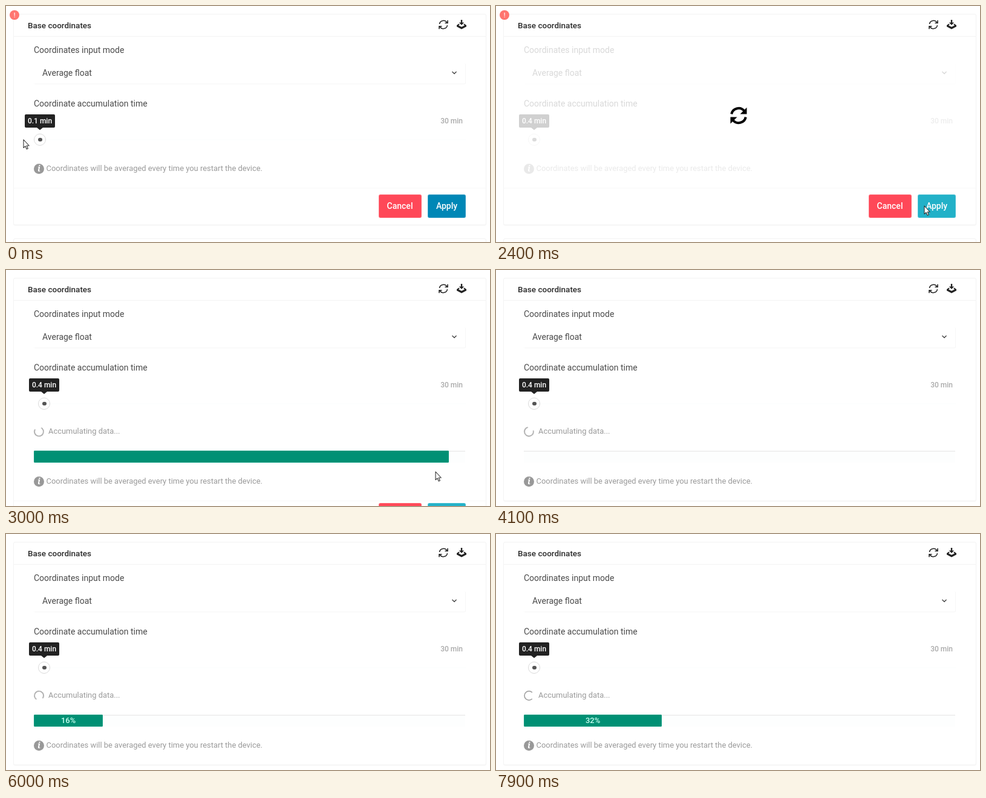
These frames come from a looping animation (800 px wide and 392 px high, 8 s). An HTML page:

```html
<!DOCTYPE html>
<html lang="en">
<head>
<meta charset="utf-8">
<title>Base coordinates</title>
<style>
* { box-sizing: border-box; }
html, body { margin: 0; width: 100%; height: 100%; overflow: hidden; background: #fff; }
.stage {
  position: relative; width: 800px; height: 392px; overflow: hidden;
  font: 14px/20px Roboto, sans-serif; color: #4a4a4a; background: #fff;
}
.stage > * { position: absolute; white-space: nowrap; }
.stage *, .stage *::after { animation: 8s linear infinite; }
svg { display: block; overflow: visible; }

/* Panel frame */
.column { left: 12px; top: 13px; width: 782px; }
.card { border: 1px solid #f3f3f3; border-radius: 3px; background: #fff; box-shadow: 0 1px 1px #f8f8f8; }
.head { height: 37px; border-bottom: 1px solid #f4f4f4; }
.body { height: 251px; animation-name: grow; }
.foot {
  position: relative; height: 61px; overflow: hidden; border-top: 1px solid #f8f8f8;
  animation-name: collapse;
}
.next { height: 60px; margin-top: 22px; }
.btn {
  position: absolute; top: 10px; height: 39px; border: 1px solid #fff3; border-radius: 3px; color: #fff;
  font-weight: 500; line-height: 37px; text-align: center;
}
.cancel { left: 602.5px; width: 71px; background: #ff4858; animation-name: lift; }
.apply { left: 684px; width: 63px; background: #0087b6; animation-name: lift, hover; }

/* Form */
.title { left: 36px; top: 22px; font-size: 13.5px; font-weight: 500; color: #2b2b2b; }
.select { left: 46px; top: 95px; width: 714px; height: 35px; border: solid #f6f6f6; border-width: 0 1px 1px 0; border-radius: 3px; }
.track { left: 66px; top: 221px; width: 694px; height: 2px; background: #fdfefe; }
.max { right: 45px; top: 181px; font-size: 12px; font-weight: 500; color: #aaa; }
.slider { left: 56px; top: 180px; animation-name: slide; }
.tip {
  position: absolute; left: -25px; width: 50px; height: 22px; border-radius: 2px;
  background: #222; color: #fff; font-size: 12px; font-weight: 500; line-height: 22px; text-align: center;
}
.tip::before { content: ""; position: absolute; left: 20px; top: 22px; border: 5px solid transparent; border-top: 4px solid #222; border-bottom: 0; }
.tip::after { content: "0.1 min"; animation-name: minutes; }
.knob { position: absolute; left: -10px; top: 32px; width: 20px; height: 20px; border: 1px solid #d9d9d9; border-radius: 50%; background: #fff; }
.knob::before { content: ""; position: absolute; left: 5.5px; top: 6px; width: 7px; height: 6px; border-radius: 3px; background: #555; }
.note { left: 46px; top: 260px; font-size: 12.93px; color: #9a9a9a; animation-name: push; }
.note span { position: absolute; left: 20.5px; top: 0; }
.note b {
  position: absolute; left: 0; top: 1.5px; width: 17px; height: 17px; border-radius: 50%; background: #999;
  color: #fff; font: italic bold 14px/16px "Noto Serif", serif; text-align: center;
}

/* Accumulation */
.acc { left: 46px; top: 258px; width: 714px; height: 64px; font-size: 12.93px; color: #9a9a9a; visibility: hidden; }
.stage > .acc { animation-name: reveal; }
.acc > span { position: absolute; left: 24px; top: 0; }
.ring { position: absolute; left: 0; top: 2px; animation-name: ring; }
.bar { position: absolute; top: 42px; width: 713px; height: 20px; border-top: 2px solid #f0f0f0; background: #fdfefe; }
.fill {
  position: absolute; top: -2px; height: 20px; width: 100%; overflow: hidden; border-radius: 2px;
  background: #009074; box-shadow: inset 0 0 0 1px #0a9c81;
  color: #c9fff1; font-weight: 500; line-height: 20px; text-align: center;
  animation-name: fill;
}
.fill::after { content: ""; animation-name: percent; }

/* Loading and pointer */
.veil { left: 13px; top: 51px; width: 780px; height: 251px; background: #fff; opacity: 0; animation-name: veil; }
.sync { left: 386px; top: 167px; opacity: 0; animation-name: sync, show; }
.badge {
  left: 6px; top: 6.5px; width: 16px; height: 16px; border-radius: 50%; background: #ff6f69; color: #fff;
  font-size: 10px; font-weight: 500; line-height: 17px; text-align: center; animation-name: badge;
}
.cursor { left: 0; top: 0; animation-name: cursor; }

@keyframes grow { 0% { height: 251px; animation-timing-function: step-end } 33.75%, 100% { height: 332px } }
@keyframes collapse {
  0%, 34.25% { height: 61px; border-top-width: 1px; animation-timing-function: ease-in-out }
  39.25%, 100% { height: 0; border-top-width: 0 }
}
@keyframes lift { 0%, 34.25% { top: 10px; animation-timing-function: ease-in-out } 39.25%, 100% { top: 0 } }
@keyframes hover { 0%, 8.7% { background-color: #0087b6 } 11%, 100% { background-color: #22b1c8 } }
@keyframes slide { 0% { transform: none; animation-timing-function: step-end } 3.75%, 100% { transform: translateX(7px) } }
@keyframes minutes { 0% { content: "0.1 min"; animation-timing-function: step-end } 3.75%, 100% { content: "0.4 min" } }
@keyframes push { 0% { transform: none; animation-timing-function: step-end } 33.75%, 100% { transform: translateY(81px) } }
@keyframes reveal { 0% { visibility: hidden; animation-timing-function: step-end } 33.75%, 100% { visibility: visible } }
@keyframes veil { 0%, 8.5% { opacity: 0 } 11%, 31.25% { opacity: .79 } 33.7%, 100% { opacity: 0 } }
@keyframes show { 0%, 8.5% { opacity: 0 } 11%, 31.25% { opacity: 1 } 33.7%, 100% { opacity: 0 } }
@keyframes sync { 0% { transform: rotate(-432deg) } 100% { transform: rotate(1008deg) } }
@keyframes badge {
  0%, 8.75%, 18.75%, 28.75% { opacity: .95 }
  13.75%, 23.75% { opacity: .85 }
  33.7% { opacity: 1 }
  33.75%, 100% { opacity: 0 }
}
@keyframes ring {
  0%, 33.75% { transform: rotate(-230deg) }
  37.5% { transform: rotate(-105deg) }
  51.25% { transform: rotate(300deg) }
  65% { transform: rotate(800deg) }
  85% { transform: rotate(1520deg) }
  98.75% { transform: rotate(2160deg) }
  100% { transform: rotate(2205deg) }
}
@keyframes fill {
  0%, 37.1% { width: 100%; animation-timing-function: ease }
  44.6%, 52.25% { width: 0; animation-timing-function: ease }
  59.75%, 64.75% { width: 8%; animation-timing-function: ease }
  72.25%, 77.25% { width: 16%; animation-timing-function: ease }
  84.75%, 89.75% { width: 24%; animation-timing-function: ease }
  97.25%, 100% { width: 32% }
}
@keyframes percent {
  0% { content: ""; animation-timing-function: step-end }
  52.25% { content: "8%"; animation-timing-function: step-end }
  64.75% { content: "16%"; animation-timing-function: step-end }
  77.25% { content: "24%"; animation-timing-function: step-end }
  89.75%, 100% { content: "32%" }
}
@keyframes cursor {
  0% { transform: translate(28px, 221px); animation-timing-function: step-end }
  2.5% { transform: translate(56px, 224px); animation-timing-function: step-end }
  3.75% { transform: translate(63px, 224px); animation-timing-function: step-end }
  5%, 31.25% { transform: translate(707px, 331px) }
  37.5% { transform: translate(709px, 334px) }
  41.25% { transform: translate(713px, 348px) }
  47.5%, 100% { transform: translate(720px, 400px) }
}
</style>
</head>
<body>
<div class="stage">
  <div class="column">
    <div class="card">
      <div class="head"></div>
      <div class="body"></div>
      <div class="foot">
        <div class="btn cancel">Cancel</div>
        <div class="btn apply">Apply</div>
      </div>
    </div>
    <div class="card next"></div>
  </div>

  <div class="title">Base coordinates</div>
  <svg style="left:715px;top:23px" width="16" height="16" fill="none" stroke="#222" stroke-width="1.6">
    <path d="M1.5 7A6.7 6.7 0 0 1 14 4.8M14.5 9A6.7 6.7 0 0 1 2 11.2"/>
    <path d="M15 .8V5.3H10.5M1 15.2V10.7H5.5"/>
  </svg>
  <svg style="left:745px;top:23px" width="16" height="16" fill="#222">
    <path d="M6.8 0h2.4v4.5h3L8 8.8 3.8 4.5h3z"/>
    <path d="M3.4 6.6 0 9v2.2l8 4.3 8-4.3V9l-3.4-2.4-1.5 1.2 1.9 1.4-5 2.6-5-2.6 1.9-1.4z"/>
  </svg>

  <div style="left:46px;top:63px">Coordinates input mode</div>
  <div class="select"></div>
  <div style="left:60px;top:101px">Average float</div>
  <svg style="left:737px;top:108px" width="8" height="6" fill="none" stroke="#444" stroke-width="1.4"><path d="M.5 1 4 4.5 7.5 1"/></svg>

  <div style="left:46px;top:152px">Coordinate accumulation time</div>
  <div class="max">30 min</div>
  <div class="track"></div>
  <div class="slider"><div class="tip"></div><div class="knob"></div></div>

  <div class="acc">
    <svg class="ring" width="17" height="17" fill="none" stroke="#999" stroke-width="1.5">
      <path d="M13.8 13.8A7.5 7.5 0 1 1 13.8 3.2"/>
    </svg>
    <span>Accumulating data...</span>
    <div class="bar"><div class="fill"></div></div>
  </div>
  <div class="note"><b>i</b><span>Coordinates will be averaged every time you restart the device.</span></div>

  <div class="veil"></div>
  <svg class="sync" width="30" height="30" fill="none" stroke="#000" stroke-width="4">
    <path d="M3.2 12.5A12 12 0 0 1 24.5 7.6M26.8 17.5A12 12 0 0 1 5.5 22.4"/>
    <path d="M28.5 1.5V12.5H17.5zM1.5 28.5V17.5H12.5z" fill="#000" stroke="none"/>
  </svg>
  <div class="badge">!</div>
  <svg class="cursor" width="12" height="19" fill="#fff" stroke="#333" stroke-width="1.1" stroke-linejoin="round">
    <path d="M1 1V14.5L4 11.8 6.1 16.7 8.3 15.8 6.2 11H10.2z"/>
  </svg>
</div>
</body>
</html>
```
